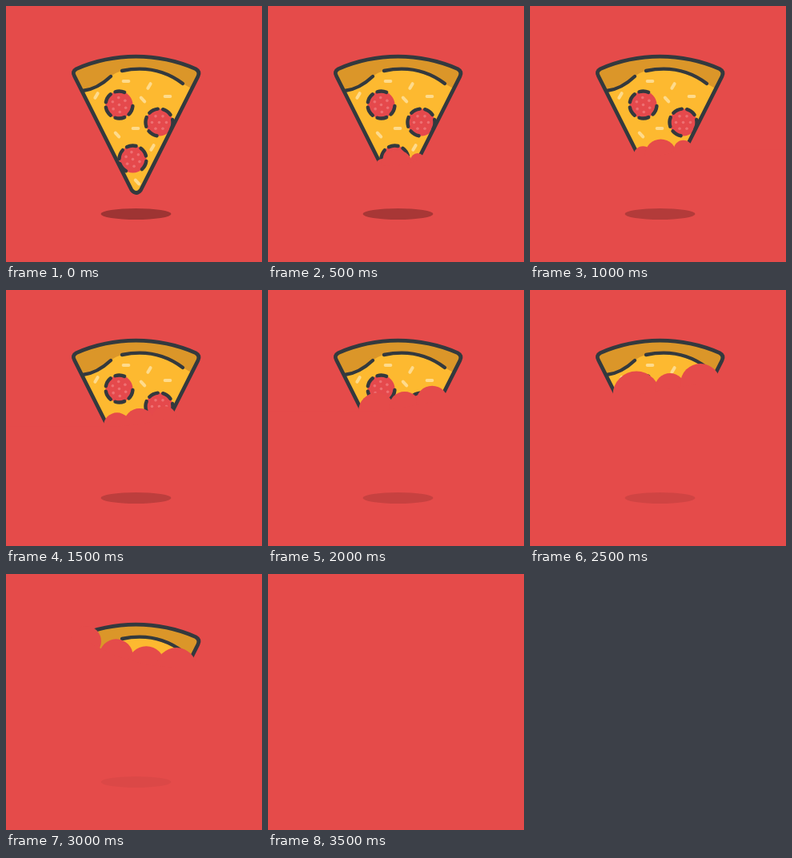
An HTML page with a canvas that plays this animation: 320 px wide and 320 px high, repeating every 4 s.

```html
<!DOCTYPE html>
<html lang="en">
<head>
<meta charset="utf-8">
<title>Pizza</title>
<style>
  html, body { margin: 0; width: 100%; height: 100%; overflow: hidden; background: #e54b4a; }
  canvas { display: block; width: 320px; height: 320px; }
</style>
</head>
<body>
<canvas id="stage"></canvas>
<script>
const SIZE = 320, STEP = 500, STEPS = 8, CRUST_STEP = 6;
const BG = '#e54b4a', INK = '#33393e', CRUST = '#db9629', CHEESE = '#fdb930';
const canvas = document.getElementById('stage');
const ratio = window.devicePixelRatio || 1;
canvas.width = canvas.height = SIZE * ratio;
const ctx = canvas.getContext('2d');
ctx.scale(ratio, ratio);

const slice = new Path2D('M88 78.6A188 188 0 0 1 237 78.6Q243 82 240 88L168.5 230Q163 237 157 230L85.7 88Q82 82 88 78.6Z');
const crust = new Path2D('M70 106H95Q114 104 131 88Q137 83 145 81Q188 72 221 97L235 105H260V50H70Z');
const crustLines = new Path2D('M96 106Q114 104 131 88M145 81Q188 72 221 97');

// sprinkles take turns lying flat, falling and rising
const tilts = [0, 48, -60];
const sprinkles = [
  [150, 94], [171, 117], [179, 100],
  [202, 113], [139, 161], [113, 112],
  [162, 153], [164, 220], [183, 177]
];

// turn: where the broken rim begins, in degrees
const pepperoni = [
  { x: 141.5, y: 123.5, turn: 25 },
  { x: 191.5, y: 145.5, turn: 120 },
  { x: 158.5, y: 191.5, turn: 140 }
];

// first and last full row of bites: x, y, radius
const firstRow = [[143, 199, 8], [161, 200, 20], [187, 193, 9]];
const lastRow = [[133, 131, 29.5], [175, 123, 19], [213, 117, 25]];

const rad = deg => deg * Math.PI / 180;
const mix = (a, b, t) => a + (b - a) * t;

function biteRow(step) {
  if (step < CRUST_STEP) {
    const t = ((step - 1) / (CRUST_STEP - 2)) ** 1.25;
    return firstRow.map((bite, i) => bite.map((v, j) => mix(v, lastRow[i][j], t)));
  }
  // the final row follows the crust down from its left corner
  return [0, 1, 2, 3].map(i => {
    const t = i / 3;
    return [mix(100, 213, t), mix(84, 117, 1 - (1 - t) ** 2), mix(19, 25, t)];
  });
}

function disc(x, y, r, color) {
  ctx.fillStyle = color;
  ctx.beginPath();
  ctx.arc(x, y, r, 0, 2 * Math.PI);
  ctx.fill();
}

function drawShadow(strength) {
  ctx.fillStyle = `rgba(0, 0, 0, ${0.31 * strength})`;
  ctx.beginPath();
  ctx.ellipse(162.5, 260, 44, 7, 0, 0, 2 * Math.PI);
  ctx.fill();
}

function drawSprinkle([x, y], i) {
  const angle = rad(tilts[i % tilts.length]);
  const dx = Math.cos(angle) * 3.3, dy = Math.sin(angle) * 3.3;
  ctx.beginPath();
  ctx.moveTo(x - dx, y - dy);
  ctx.lineTo(x + dx, y + dy);
  ctx.stroke();
}

function drawPepperoni({ x, y, turn }) {
  disc(x, y, 17, '#e5494c');
  disc(x, y, 1.8, '#ee7072');
  for (let i = 0; i < 6; i++) {
    const angle = rad(turn + i * 60);
    disc(x + 9 * Math.cos(angle), y + 9 * Math.sin(angle), 1.8, '#ee7072');
  }
  for (let i = 0; i < 5; i++) {
    const middle = turn + i * 62;
    ctx.beginPath();
    ctx.arc(x, y, 17, rad(middle - 20), rad(middle + 20));
    ctx.stroke();
  }
}

function drawSlice() {
  ctx.save();
  ctx.clip(slice);
  ctx.fillStyle = CHEESE;
  ctx.fillRect(0, 0, SIZE, SIZE);
  ctx.fillStyle = CRUST;
  ctx.fill(crust);
  ctx.lineCap = 'round';
  ctx.lineWidth = 4;
  ctx.strokeStyle = '#fedb8c';
  sprinkles.forEach(drawSprinkle);
  ctx.strokeStyle = INK;
  ctx.lineWidth = 4.4;
  pepperoni.forEach(drawPepperoni);
  ctx.stroke(crustLines);
  ctx.restore();

  ctx.strokeStyle = INK;
  ctx.lineWidth = 4.8;
  ctx.lineJoin = 'round';
  ctx.stroke(slice);
}

function drawBites(row) {
  row.forEach(([x, y, r]) => disc(x, y, r, BG));
  // everything below the row is gone
  ctx.beginPath();
  ctx.moveTo(0, 240);
  ctx.lineTo(0, row[0][1]);
  row.forEach(([x, y]) => ctx.lineTo(x, y));
  ctx.lineTo(SIZE, row[row.length - 1][1]);
  ctx.lineTo(SIZE, 240);
  ctx.fill();
}

function draw(time) {
  const step = Math.floor(time / STEP) % STEPS;
  ctx.fillStyle = BG;
  ctx.fillRect(0, 0, SIZE, SIZE);
  if (step > CRUST_STEP) return;
  drawSlice();
  if (step > 0) drawBites(biteRow(step));
  drawShadow(1 - step / (STEPS - 1));
}

const start = performance.now();
function tick() {
  draw(performance.now() - start);
  requestAnimationFrame(tick);
}
tick();
</script>
</body>
</html>
```
